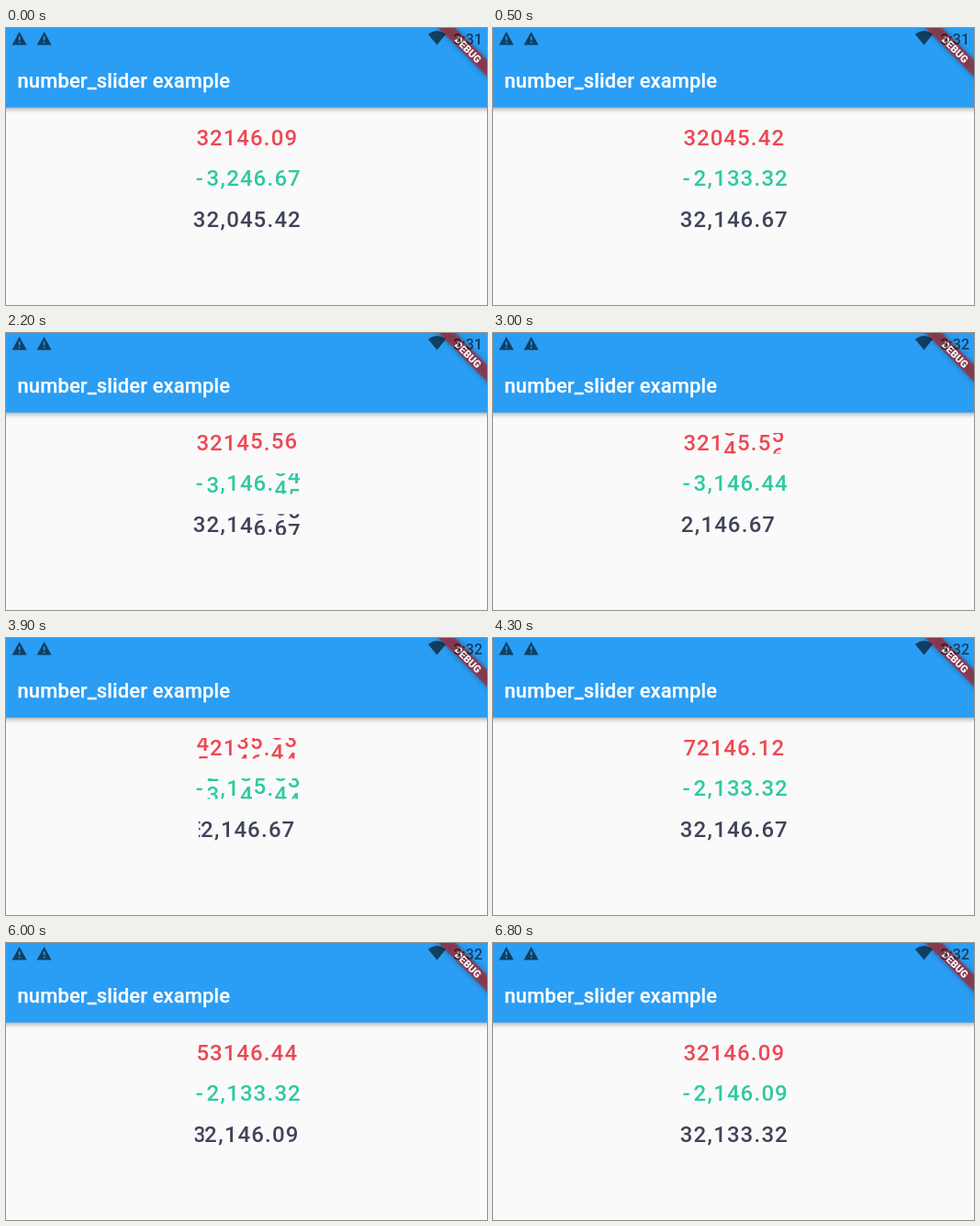
An HTML page that plays this animation: 524 by 302 pixels, repeating every 7200 ms.

```html
<!DOCTYPE html>
<html lang="en">
<head>
<meta charset="utf-8">
<title>Number slider</title>
<style>
  html, body { margin: 0; width: 100%; height: 100%; overflow: hidden; background: #fafafa; }
  #stage { display: block; position: absolute; left: 0; top: 0; font-family: Roboto, sans-serif; }
  .cell { overflow: hidden; }
  .digit { font-size: 24px; font-weight: 500; text-anchor: middle; }
  #bar { filter: drop-shadow(0 2px 2.5px rgba(0, 0, 0, .32)); }
  #ribbon { filter: drop-shadow(0 0 3px rgba(0, 0, 0, .45)); }
</style>
</head>
<body>
<svg id="stage" width="524" height="302" viewBox="0 0 524 302">
  <rect width="524" height="302" fill="#fafafa"/>
  <rect id="bar" x="-10" y="-10" width="544" height="96.7" fill="#2a9df4"/>
  <text x="12.5" y="65" font-size="21.9" font-weight="500" letter-spacing=".17" fill="#fff" stroke="#fff" stroke-width=".25">number_slider example</text>
  <g transform="translate(524 0) rotate(45)">
    <rect id="ribbon" x="-50" y="24.5" width="100" height="13" fill="#b71c1c" fill-opacity=".66"/>
    <text x="2" y="35.2" font-size="11.1" font-weight="900" text-anchor="middle" fill="#fff">DEBUG</text>
  </g>
  <g fill="#000" fill-opacity=".6">
    <path id="warning" fill-rule="evenodd" d="M14.6 4 L22.6 18.5 H6.6 Z M13.8 9.3 V13.6 H15.4 V9.3 Z M13.8 15 V16.6 H15.4 V15 Z"/>
    <use href="#warning" x="27"/>
    <path d="M469.5 18.5 L459.8 6.7 Q469.5 -.5 479.2 6.7 Z"/>
    <text id="clock" x="519" y="17.5" font-size="16" font-weight="500" text-anchor="end"></text>
  </g>
  <g id="rows"></g>
</svg>
<script>
const LOOP = 7200, TICK = 100;
const ROLL = 300, RESIZE = 450;
const CENTER = 262.3, CELL_H = 22.5, BASELINE = 19;
const ROWS = [
  { top: 109, color: '#ee4854' },
  { top: 153, color: '#2fc9a2' },
  { top: 197.6, color: '#3f4459' }
];
// start of each change, followed by the values it leads to
const STEPS = [
  [-1000, '32146.09', '-3,246.67', '32,045.42'],
  [180, '32045.42', '-2,133.32', '32,146.67'],
  [1080, '32146.67', '-2,146.09', '32,133.32'],
  [1980, '32145.56', '-3,146.44', '32,146.67'],
  [2950, '32135.54', '-3,146.44', '2,146.67'],
  [3850, '72146.12', '-2,133.32', '32,146.67'],
  [4750, '32146.09', '-2,143.61', '3,146.44'],
  [5698, '53146.44', '-2,133.32', '32,146.09'],
  [6500, '32146.09', '-2,146.09', '32,133.32']
];

const clamp = v => Math.max(0, Math.min(1, v));
const easeOut = v => 1 - (1 - v) ** 2;
const mix = (a, b, p) => a + (b - a) * p;
const isDigit = c => c >= '0' && c <= '9';
const slotWidth = c => c === ',' ? 7.3 : c === '.' ? 8.3 : 14.6;
const rowWidth = s => [...s].reduce((sum, c) => sum + slotWidth(c), 0);

const glyph = (c, width, dy) =>
  `<text class="digit" x="${width / 2}" y="${BASELINE + dy}">${c}</text>`;

function cellContent(from, to, width, p) {
  if (!isDigit(from) || !isDigit(to)) return glyph(to, width, 0);
  const value = mix(+from, +to, p);
  const low = Math.floor(value);
  const shown = low === value ? [low] : [low, low + 1];
  return shown.map(n => glyph(n, width, (n - value) * CELL_H)).join('');
}

function drawRow({ top, color }, from, to, roll, resize) {
  const extra = to.length - from.length;
  let x = CENTER - mix(rowWidth(from), rowWidth(to), resize) / 2;
  const cells = [...to].map((c, i) => {
    const width = slotWidth(c) * (i < extra ? resize : 1);
    // separators may hang below the rolling window
    const overflow = isDigit(c) ? 'hidden' : 'visible';
    const cell = `<svg class="cell" style="overflow:${overflow}" x="${x}" y="${top}" width="${width}" height="${CELL_H}">` +
      cellContent(from[i - extra] ?? '', c, width, roll) + '</svg>';
    x += width;
    return cell;
  });
  return `<g fill="${color}">${cells.join('')}</g>`;
}

const rows = document.getElementById('rows');
const clock = document.getElementById('clock');
let lastTime = -1;

function render(time) {
  const index = STEPS.findLastIndex(step => step[0] <= time);
  const to = STEPS[index], from = STEPS[Math.max(0, index - 1)];
  const elapsed = time - to[0];
  const roll = easeOut(clamp(elapsed / ROLL));
  const resize = clamp(elapsed / RESIZE);
  rows.innerHTML = ROWS.map((row, i) => drawRow(row, from[i + 1], to[i + 1], roll, resize)).join('');
  clock.textContent = time < 3000 ? '3:31' : '3:32';
}

function frame() {
  const time = Math.floor(performance.now() % LOOP / TICK) * TICK;
  if (time !== lastTime) render(lastTime = time);
  requestAnimationFrame(frame);
}
frame();
</script>
</body>
</html>
```
